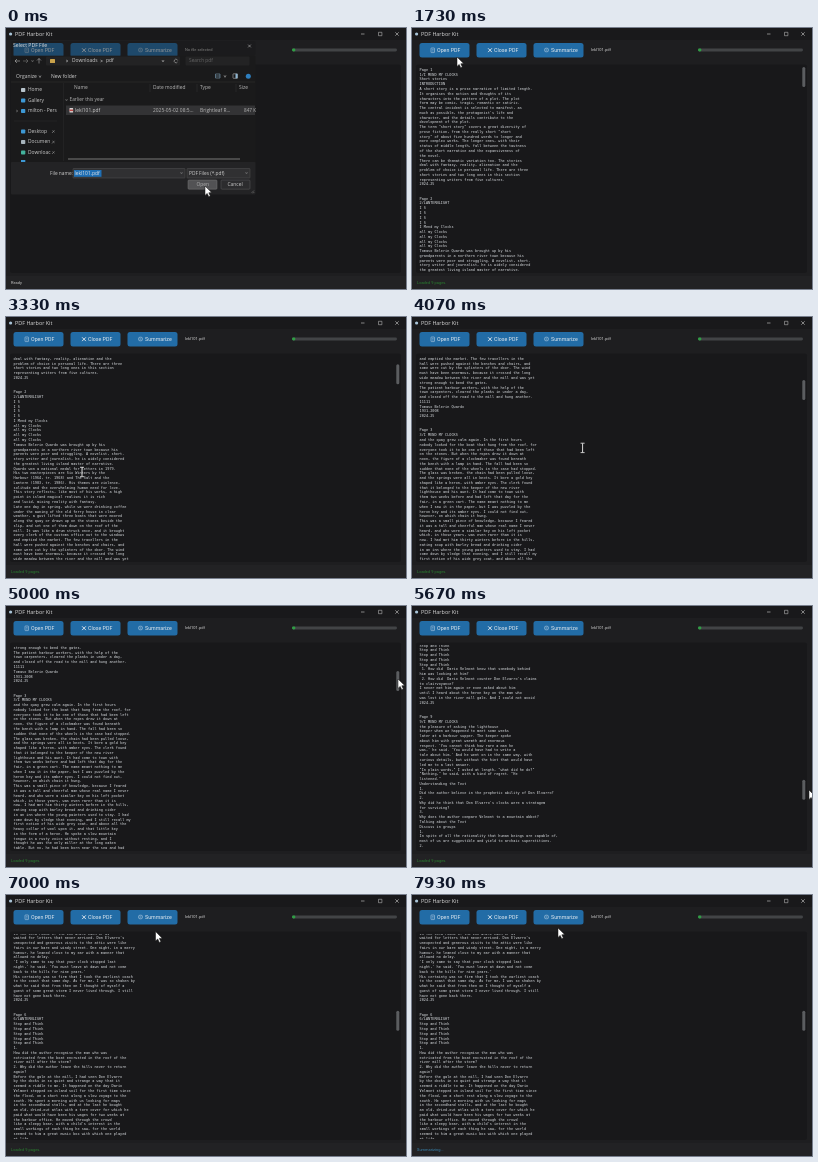
Write an HTML page with a canvas that moves like this. It is 400 px wide and 261 px high and loops after 8 s.

```html
<!DOCTYPE html>
<html lang="en">
<head>
<meta charset="utf-8">
<title>Document reader</title>
<style>
html, body { margin: 0; width: 100%; height: 100%; overflow: hidden; background: #1e1e20; }
canvas { display: block; width: 400px; height: 261px; }
</style>
</head>
<body>
<canvas id="stage"></canvas>
<script>
const W = 400, H = 261, LOOP = 8000, PITCH = 4.77;
const canvas = document.getElementById('stage');
const ctx = canvas.getContext('2d');
const dpr = Math.max(1, window.devicePixelRatio || 1);
canvas.width = W * dpr;
canvas.height = H * dpr;

const UI = 'Roboto, "Open Sans", sans-serif';
const SYS = '"Open Sans", "Noto Sans", sans-serif';
const MONO = '"DejaVu Sans Mono", monospace';
const FILE = 'lekl101.pdf';

// Document text, each block placed at its first line number.
const blocks = {
0: `Page 1
1/I MEND MY CLOCKS
Short stories
INTRODUCTION
A short story is a prose narrative of limited length.
It organises the action and thoughts of its
characters into the pattern of a plot. The plot
form may be comic, tragic, romantic or satiric.
The central incident is selected to manifest, as
much as possible, the protagonist's life and
character, and the details contribute to the
development of the plot.
The term "short story" covers a great diversity of
prose fiction, from the really short "short
story" of about five hundred words to longer and
more complex works. The longer ones, with their
status of middle length, fall between the tautness
of the short narrative and the expansiveness of
the novel.
There can be thematic variation too. The stories
deal with fantasy, reality, alienation and the
problem of choice in personal life. There are three
short stories and two long ones in this section
representing writers from five cultures.
2024-25


Page 2
2/LANTERNLIGHT
I S
I S
I S
I S
I Mend my Clocks
all my Clocks
all my Clocks
all my Clocks
all my Clocks
Tomaso Belerin Quardo was brought up by his
grandparents in a northern river town because his
parents were poor and struggling. A novelist, short-
story writer and journalist, he is widely considered
the greatest living island master of narrative.
Quardo won a national medal for letters in 1979.
His two masterpieces are Six Winters by the
Harbour (1964, tr. 1968) and The Salt and the
Lantern (1983, tr. 1986). His themes are violence,
solitude and the overwhelming human need for love.
This story reflects, like most of his works, a high
point in island magical realism; it is rich
and lucid, mixing reality with fantasy.
Late one day in spring, while we were drinking coffee
under the awning of the old ferry house in clear
weather, a gust lifted three boats that were moored
along the quay or drawn up on the stones beside the
slip, and set one of them down on the roof of the
mill. It was like a drum struck once, and it brought
every clerk of the customs office out to the windows
and emptied the market. The few travellers in the
hall were pushed against the benches and chairs, and
some were cut by the splinters of the door. The wind
must have been enormous, because it crossed the long
wide meadow between the river and the mill and was yet
strong enough to bend the gates.
The patient harbour workers, with the help of the
town carpenters, cleared the planks in under a day,
and closed off the road to the mill and hung another.
11111
Tomaso Belerin Quardo
1931-2008
2024-25`,
73: `Page 3
3/I MEND MY CLOCKS
and the quay grew calm again. In the first hours
nobody looked for the boat that hung from the roof, for
everyone took it to be one of those that had been left
on the stones. But when the ropes drew it down at
noon, the figure of a clockmaker was found beneath
the bench with a lamp in hand. The fall had been so
sudden that none of the wheels in the case had stopped.
The glass was broken, the chain had been pulled loose,
and the springs were all in knots. It bore a gold key
shaped like a heron, with amber eyes. The clerk found
that it belonged to the keeper of the new river
lighthouse and his aunt. It had come to town with
them two weeks before and had left that day for the
fair, in a green cart. The name meant nothing to me
when I saw it in the paper, but I was puzzled by the
heron key and its amber eyes. I could not find out,
however, on which chain it hung.
This was a small piece of knowledge, because I feared
it was a tall and cheerful man whose real name I never
heard, and who wore a similar key on his left pocket
which, in those years, was even rarer than it is
now. I had met him thirty winters before in the hills,
eating soup with barley bread and drinking cider
in an inn where the young painters used to stay. I had
come down by sledge that evening, and I still recall my
first notion of his wide grey coat, and above all the
heavy collar of wool upon it, and that little key
in the form of a heron. He spoke a slow mountain
tongue in a rusty voice without resting, and I
thought he was the only miller at the long oaken
table. But no, he had been born near the sea and had`,
185: `in the cold rooms of the inn while each of us
waited for letters that never arrived. Don Elvarro's
unexpected and generous visits to the attic were like
fairs in our bare and windy street. One night, in a merry
humour, he leaned close to my ear with a manner that
allowed no delay.
'I only came to say that your clock stopped last
night,' he said. 'You must leave at dawn and not come
back to the hills for nine years.'
His certainty was so firm that I took the earliest coach
to the coast that same day. As for me, I was so shaken by
what he said that from then on I thought of myself a
guest of some great storm I never lived through. I still
have not gone back there.
2024-25


Page 6
6/LANTERNLIGHT
Stop and Think
Stop and Think
Stop and Think
Stop and Think
Stop and Think
1.
How did the author recognise the man who was
extricated from the boat encrusted in the roof of the
river mill after the storm?
2. Why did the author leave the hills never to return
again?
Before the gale at the mill, I had seen Don Elvarro
by the docks in so quiet and strange a way that it
seemed a riddle to me. It happened on the day Dario
Velmont stepped on island soil for the first time since
the flood, on a short rest along a slow voyage to the
south. He spent a morning with us looking for maps
in the secondhand stalls, and at the last he bought
an old, dried-out atlas with a torn cover for which he
paid what would have been his wages for two weeks at
the harbour office. He moved through the crowd
like a sleepy bear, with a child's interest in the
small workings of each thing he saw, for the world
seemed to him a great music box with which one played
at life.
I have never known anyone closer to the idea one has
of a country abbot: he was hungry and polite.
Even against his will, he always led the table.
Ottilia, his wife, would tie a cloth around his neck that
belonged in a barber's room more than at lunch, but it
was the only way to keep him from bathing in sauce.
That day by the docks was typical. He ate three whole`,
326: `Stop and Think
Stop and Think
Stop and Think
Stop and Think
Stop and Think
 1. How did  Dario Velmont know that somebody behind
him was looking at him?
 2. How did  Dario Velmont counter Don Elvarro's claims
to clairvoyance?
I never met him again or even asked about him
until I heard about the heron key on the man who
was lost in the river mill gale. And I could not avoid
2024-25


Page 9
9/I MEND MY CLOCKS
the pleasure of asking the lighthouse
keeper when we happened to meet some weeks
later at a harbour supper. The keeper spoke
about him with great warmth and enormous
respect. 'You cannot think how rare a man he
was,' he said. 'You would have had to write a
tale about him.' And he went on in the same way, with
curious details, but without the hint that would have
led me to a last answer.
"In plain words," I asked at length, "what did he do?"
"Nothing," he said, with a kind of regret. "He
listened."
Understanding the Text
1.
Did the author believe in the prophetic ability of Don Elvarro?
2.
Why did he think that Don Elvarro's clocks were a stratagem
for surviving?
3.
Why does the author compare Velmont to a mountain abbot?
Talking about the Text
Discuss in groups
1.
In spite of all the rationality that human beings are capable of,
most of us are suggestible and yield to archaic superstitions.
2.`
};

const lines = [];
for (const start in blocks) blocks[start].split('\n').forEach((s, i) => lines[+start + i] = s);

// The pages passed while dragging repeat the prose of page 3.
function fill(from, to, heads) {
  for (let n = from; n < to; n++) lines[n] = lines[75 + (n - from) % 31];
  for (const page in heads) {
    const n = heads[page];
    lines[n - 3] = '2024-25';
    lines[n - 2] = lines[n - 1] = '';
    lines[n] = 'Page ' + page;
    lines[n + 1] = page + (page % 2 ? '/I MEND MY CLOCKS' : '/LANTERNLIGHT');
  }
}
fill(106, 185, { 4: 116, 5: 159 });
fill(236, 326, { 7: 248, 8: 294 });

// Keys: time, then values.
const pointerKeys = [
  [0, 199, 158], [150, 199, 158], [850, 47, 30], [1730, 45, 29], [1850, 45, 29],
  [2350, 72, 196], [2700, 76, 160], [3330, 76, 155], [3900, 80, 155],
  [4380, 392, 72], [5000, 392, 73], [5670, 397, 184], [6200, 387, 128],
  [6380, 387, 125], [6920, 150, 38], [7300, 146, 26], [7930, 146, 33]
];
const scrollKeys = [
  [2680, 0], [3280, 20], [3420, 20], [4250, 63], [5020, 63],
  [5670, 326.5], [6200, 193.4], [6380, 185.7]
];

function at(keys, t) {
  if (t <= keys[0][0]) return keys[0].slice(1);
  for (let i = 1; i < keys.length; i++) {
    const a = keys[i - 1], b = keys[i];
    if (t < b[0]) {
      const u = (t - a[0]) / (b[0] - a[0]), e = u * u * (3 - 2 * u);
      return a.slice(1).map((v, k) => v + (b[k + 1] - v) * e);
    }
  }
  return keys[keys.length - 1].slice(1);
}

function box(x, y, w, h, color, r = 0, stroke) {
  ctx.beginPath();
  ctx.roundRect(x, y, w, h, r);
  if (color) { ctx.fillStyle = color; ctx.fill(); }
  if (stroke) { ctx.strokeStyle = stroke; ctx.lineWidth = 0.5; ctx.stroke(); }
}

function path(points, color, width = 0.6) {
  ctx.beginPath();
  for (let i = 0; i < points.length; i += 2) ctx.lineTo(points[i], points[i + 1]);
  ctx.strokeStyle = color;
  ctx.lineWidth = width;
  ctx.stroke();
}

// Type is set ten times larger and scaled down to keep fractional advances.
function label(s, x, y, size, color, font = SYS) {
  ctx.save();
  ctx.translate(x, y);
  ctx.scale(0.1, 0.1);
  ctx.font = size * 10 + 'px ' + font;
  ctx.textBaseline = 'middle';
  ctx.fillStyle = color;
  ctx.fillText(s, 0, 0);
  ctx.restore();
}

function cross(x, y, r, color, width) {
  path([x - r, y - r, x + r, y + r], color, width);
  path([x - r, y + r, x + r, y - r], color, width);
}

function chevron(x, y, color, dx = 0, dy = 1) {
  path([x - dx - dy, y - dy - dx, x + dx, y + dy, x - dx + dy, y - dy + dx], color, 0.5);
}

function button(x, text) {
  box(x, 15, 50, 14.4, '#226ca6', 2.5);
  label(text, x + 17.5, 22.3, 5.3, '#e4ebf0', UI);
}

function drawWindow(loaded) {
  box(0, 0, W, H, '#1e1e20');
  box(0, 0, W, 12, '#19191b');
  box(3, 4.4, 3.2, 3.2, '#a9c4d8', 1.6);
  label('PDF Harbor Kit', 9, 6.2, 5.4, '#dedede');
  path([355, 6, 358.5, 6], '#ccc');
  box(372.5, 4.3, 3.4, 3.4, null, 0, '#ccc');
  cross(391, 6, 1.7, '#ccc', 0.6);

  button(7.5, 'Open PDF');
  button(64.5, 'Close PDF');
  button(121.5, 'Summarize');
  box(19, 20, 3.5, 4.6, null, 0.5, '#c8dbea');
  path([20, 21.6, 21.6, 21.6], '#c8dbea', 0.4);
  path([20, 23, 21.6, 23], '#c8dbea', 0.4);
  cross(78, 22.2, 1.9, '#e8eef2', 0.9);
  box(132.5, 20.2, 4, 3.6, null, 1.5, '#c8dbea');
  path([133.5, 22, 135.5, 22], '#c8dbea', 0.6);

  label(loaded ? FILE : 'No file selected', 179, 22.3, 4, '#cfcfcf', UI);
  box(286, 20.6, 105, 2.8, '#424446', 1.4);
  box(286, 20.6, 3.4, 2.8, '#2f9e44', 1.4);

  box(4, 36.5, 391, 208.5, '#18181a', 2);
  box(0, 248, W, 13, '#222224');
}

function drawDocument(scroll) {
  ctx.save();
  ctx.beginPath();
  ctx.rect(4, 39, 384, 205);
  ctx.clip();
  const first = Math.max(0, Math.floor(scroll) - 1);
  for (let n = first; n < first + 47; n++) {
    if (lines[n]) label(lines[n], 7.5, 42 + (n - scroll) * PITCH, 3.54, '#dce0e4', MONO);
  }
  ctx.restore();
  box(390.3, 39 + scroll * PITCH * 0.0866, 3, 20, '#5b5d60', 1.5);
}

function drawDialog() {
  const ink = '#cfcfcf', dim = '#858585';
  box(5, 13, 244.5, 14.5, 'rgba(24,24,26,0.42)', 2);
  box(5, 27.5, 244.5, 139, '#1a1a1b', 1);
  label('Select PDF File', 7, 18, 5.1, '#e2e2e2');
  cross(243.5, 18, 1.4, ink, 0.5);

  path([9, 33, 14, 33], ink, 0.5);
  path([11, 31, 9, 33, 11, 35], ink, 0.5);
  path([17, 33, 22, 33], dim, 0.5);
  path([20, 31, 22, 33, 20, 35], dim, 0.5);
  chevron(26.5, 33, dim);
  path([33, 35.5, 33, 30.5], ink, 0.5);
  path([31, 32.5, 33, 30.5, 35, 32.5], ink, 0.5);
  box(40, 28.5, 134, 9, '#232324', 1);
  box(44, 31, 5, 4, '#c9a24a', 0.5);
  chevron(61, 33, ink, 1, 0);
  label('Downloads', 66, 33, 4.9, ink);
  chevron(95.5, 33, ink, 1, 0);
  label('pdf', 100, 33, 4.9, ink);
  chevron(157, 33, ink);
  ctx.beginPath();
  ctx.arc(170, 33, 1.8, 0.6, 5.9);
  ctx.stroke();
  box(179.5, 28.5, 64, 9, '#232324', 1);
  label('Search pdf', 183, 33, 4.8, '#666');

  label('Organize', 10, 48.3, 5, ink);
  chevron(34, 48.5, ink);
  label('New folder', 45, 48.3, 5, ink);
  box(209.5, 46, 4.5, 4, null, 0, '#8db6d2');
  path([209.5, 48, 214, 48], '#8db6d2', 0.5);
  chevron(219, 48.3, ink);
  box(227, 45.8, 4.5, 4.5, null, 0.5, ink);
  box(229.5, 45.8, 2, 4.5, '#8db6d2');
  box(239.8, 45.7, 5, 5, '#2e7fc0', 2.5);
  path([5, 54, 249, 54], '#303032', 0.5);

  [['Home', 62, '#b8c4cc'], ['Gallery', 72.5, '#3d98d4'], ['milton - Pers', 83, '#3d98d4'],
   ['Desktop', 103.5, '#3d98d4'], ['Documen', 114, '#a7b4bc'], ['Downloac', 124.5, '#43b29c']]
    .forEach(([name, y, color], i) => {
      box(15, y - 2, 4.3, 4, color, 0.8);
      label(name, 22, y, 4.9, ink);
      if (i > 2) {
        path([46, y + 1.5, 48.5, y - 1.2], '#999', 0.6);
        path([46.5, y - 1, 48.5, y + 0.8], '#999', 0.6);
      }
    });
  chevron(11, 83, dim, 1, 0);
  path([8, 93, 51, 93], '#2b2b2d', 0.5);
  box(15, 132, 4.3, 2, '#3d98d4');
  path([57.5, 55, 57.5, 133], '#2b2b2d', 0.5);

  [['Name', 68], ['Date modified', 147], ['Type', 194], ['Size', 233]]
    .forEach(([name, x]) => label(name, x, 60, 4.9, '#b9b9b9'));
  [144, 191, 230].forEach(x => path([x, 56, x, 64], '#343436', 0.5));
  chevron(60.5, 72, dim);
  label('Earlier this year', 63.5, 72, 4.8, '#b9b9b9');
  box(60, 77.5, 189, 9.5, '#333335');
  box(63.5, 80, 3.6, 4.6, '#d3d3d3', 0.3);
  box(63.5, 81.5, 3.6, 1.6, '#b94a48');
  label(FILE, 69, 82.3, 4.9, ink);
  label('2025-05-02 08:5...', 147, 82.3, 4.9, '#b9b9b9');
  label('Brightleaf R...', 194, 82.3, 4.9, '#b9b9b9');
  label('847 K', 238, 82.3, 4.7, '#b9b9b9');
  path([62, 131, 234, 131], '#909090', 0.8);

  box(5, 134, 244.5, 32.5, '#232325', 1);
  label('File name:', 44, 145.3, 4.8, ink);
  box(67, 140.5, 112, 9.5, '#303032', 0.5, '#505052');
  box(68, 142, 27.5, 6.8, '#1f6fb5');
  label(FILE, 68.5, 145.3, 4.9, '#e2e2e2');
  chevron(175.5, 145, dim);
  box(181, 140.5, 63, 9.5, '#303032', 0.5, '#505052');
  label('PDF Files (*.pdf)', 183, 145.3, 4.8, ink);
  chevron(240.5, 145, dim);
  box(182, 152, 29, 9.2, '#525254', 1, '#777');
  label('Open', 190.5, 156.6, 4.9, '#b0b0b0');
  box(215, 152, 29, 9.2, '#2c2c2e', 1, '#5a5a5c');
  label('Cancel', 221.5, 156.6, 4.9, ink);
  path([245.5, 165, 248, 162.5], '#777', 0.6);
  path([247, 165.3, 248.3, 164], '#777', 0.6);
}

function drawPointer(x, y, beam) {
  if (beam) {
    path([x, y - 4.5, x, y + 4.5], '#eee', 0.9);
    path([x - 2, y - 4.7, x + 2, y - 4.7], '#eee', 0.8);
    path([x - 2, y + 4.7, x + 2, y + 4.7], '#eee', 0.8);
    return;
  }
  const shape = [0, 0, 0, 9.4, 2.2, 7.4, 3.8, 10.8, 5.3, 10.1, 3.8, 6.8, 6.7, 6.6];
  ctx.beginPath();
  for (let i = 0; i < shape.length; i += 2) ctx.lineTo(x + shape[i], y + shape[i + 1]);
  ctx.closePath();
  ctx.fillStyle = '#fff';
  ctx.fill();
  ctx.strokeStyle = '#111';
  ctx.lineWidth = 0.5;
  ctx.stroke();
}

function draw(t) {
  const open = t < 200, loaded = t >= 350;
  ctx.setTransform(dpr, 0, 0, dpr, 0, 0);
  drawWindow(loaded);

  let [scroll] = at(scrollKeys, t);
  if (t < 4300) scroll = Math.round(scroll);
  if (loaded) drawDocument(scroll);

  if (t >= 7400) label('Summarizing...', 5, 255, 4, '#3a86b0', UI);
  else if (loaded) label('Loaded 9 pages.', 5, 255, 4, '#2a8030', UI);
  else label('Ready', 5, 255, 4, '#cfcfcf', UI);

  if (open) {
    ctx.globalAlpha = Math.min(1, (200 - t) / 120);
    drawDialog();
    ctx.globalAlpha = 1;
  }

  const [x, y] = at(pointerKeys, t);
  drawPointer(x, y, loaded && x < 385 && y > 40 && y < 244);
}

function tick(now) {
  draw(now % LOOP);
  requestAnimationFrame(tick);
}
requestAnimationFrame(tick);
</script>
</body>
</html>
```
